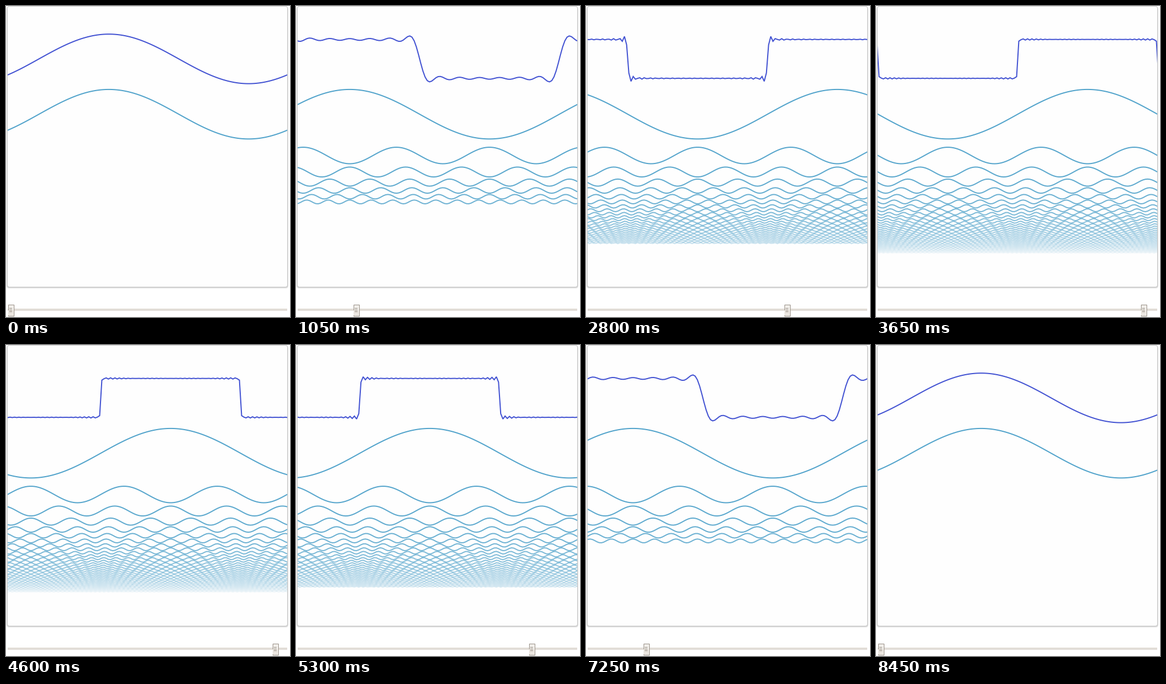
A matplotlib script that plays this animation: 508 px wide and 555 px high, repeating every 8500 ms.

```python
import numpy as np
import matplotlib.pyplot as plt
from matplotlib.animation import FuncAnimation
from matplotlib.patches import FancyBboxPatch, Rectangle

W, H, DPI = 508, 555, 100
FRAMES, INTERVAL = 170, 50
PX = 72 / DPI
LEFT, SPAN = 3, 500           # inner panel origin and wave period
AMP = 44.2
SUM_Y, FIRST_Y = 94.4, 193.1
MAX_TERMS = 36
TERM_SCALE = 35.4
DRIFT = SPAN / 120            # one period in six seconds
CUT = 160                     # the phase skips ahead here

plt.rcParams["path.simplify"] = False

fig = plt.figure(figsize=(W / DPI, H / DPI), dpi=DPI, facecolor="white")
ax = fig.add_axes([0, 0, 1, 1])
ax.set(xlim=(0, W), ylim=(H, 0))
ax.axis("off")


def rounded(x, y, w, h, r, **style):
    box = FancyBboxPatch((x, y), w, h, **style,
                         boxstyle=f"round,pad=0,rounding_size={r}")
    return ax.add_patch(box)


# Panel with a soft shadow
for grow in (2.2, 1.5, 0.8):
    rounded(2 - grow / 2, 1, 502 + grow, 501 + grow, 4.5,
            fc="black", ec="none", alpha=0.06)
rounded(2.5, 0.5, 501, 501, 4, fc="#fefefe", ec="#c8c8c8", lw=PX)
window = Rectangle((LEFT, 1), SPAN, 500, transform=ax.transData)

# Samples travel with the wave and straddle its zero crossings
step = SPAN / 128
u = (np.arange(256) + 0.5) * step
odd = 2 * np.arange(MAX_TERMS) + 1
terms = AMP * np.sin(2 * np.pi * np.outer(odd, u) / SPAN) / odd[:, None]
sums = np.cumsum(terms, axis=0)
amps = AMP / odd
rows = FIRST_Y + np.append(0, np.cumsum(1.25 * (amps[:-1] + amps[1:])))


def wave(color, alpha=1.0):
    line, = ax.plot([], [], color=color, alpha=alpha, lw=2 * PX,
                    solid_joinstyle="miter", solid_capstyle="butt")
    line.set_clip_path(window)
    return line


parts = [wave("#51a3cb", 1 - k / 35.8) for k in range(MAX_TERMS - 1)]
total = wave("#4252d2")

# Slider
ax.add_patch(Rectangle((LEFT, 540), SPAN, 4, fc="#e2ddd7", ec="none"))
knob = ax.add_patch(Rectangle((3.5, 532.5), 10, 20, fc="#f2efeb",
                              ec="#989087", lw=PX, zorder=4))
shade = ax.add_patch(Rectangle((4, 543), 9, 9, fc="#ebe6e0",
                               ec="none", zorder=5))
grips = [ax.add_patch(Rectangle((6, y), 5, 1, fc="#8f877d", ec="none", zorder=6))
         for y in (539, 542, 545)]


def knob_x(n):
    return np.interp(n * INTERVAL,
                     [350, 1900, 3600, 3700, 4600, 4930, 6000, 7250, 7860],
                     [8.5, 228.5, 476, 481, 481.5, 479, 311.5, 107.5, 8.5])


def peak_x(n):
    if n >= CUT:
        return 184 + DRIFT * (FRAMES - n)
    if n > 145:
        return 84 - DRIFT * (n - 145)
    return 184 - np.interp(n, [0, 38, 73, 92, 120, 145],
                           [0, 159, 305.5, 389.5, 500, 600])


def draw(n):
    kx = knob_x(n)
    count = int(np.clip(TERM_SCALE * (kx - 8.5) / 489, 1, len(parts)))
    start = (peak_x(n) - SPAN / 4 - LEFT) % SPAN - SPAN + LEFT
    x = start + u

    for k, line in enumerate(parts):
        line.set_visible(k < count)
        if k < count:
            line.set_data(x, rows[k] - terms[k])
    total.set_data(x, SUM_Y - sums[count - 1])

    left = round(kx - 5.5)
    knob.set_x(left + 0.5)
    shade.set_x(left + 1)
    for grip in grips:
        grip.set_x(left + 3)
    return [*parts, total, knob, shade, *grips]


anim = FuncAnimation(fig, draw, frames=FRAMES, interval=INTERVAL,
                     repeat=True, repeat_delay=0, blit=False)
plt.show()
```
